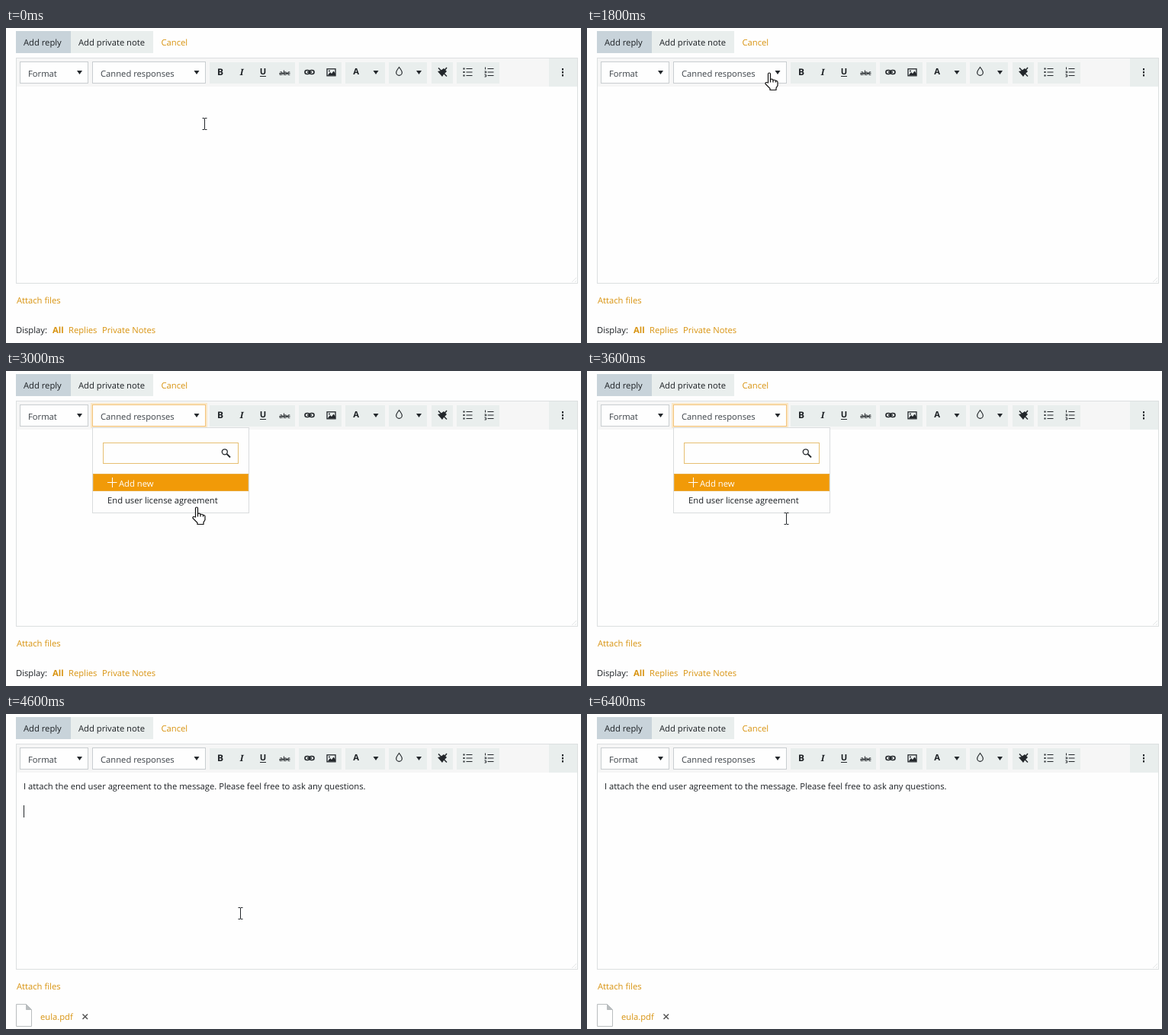
An HTML page for the animation above (6.8 s loop, 754x414 px).

```html
<!DOCTYPE html>
<html lang="en">
<head>
<meta charset="utf-8">
<title>Canned response</title>
<style>
html, body { margin: 0; width: 100%; height: 100%; overflow: hidden; background: #fefefe; }
svg { display: block; }
text { font: 11.22px "Open Sans", "Noto Sans", sans-serif; fill: #1b1f23; text-rendering: geometricPrecision; white-space: pre; }
.link { fill: #d8930f; }
.bold { font-weight: 700; }
.mid { text-anchor: middle; }
.group { fill: #e9eeed; }
.box { fill: #fefefe; stroke: #c9cdd0; }
.line { fill: none; stroke: #23272b; }
.ink { fill: #23272b; }
</style>
</head>
<body>
<svg width="754" height="414" viewBox="0 0 754 414">
  <defs>
    <path id="arrow" class="ink" d="M-3.5 -2.5h7l-3.5 5z"/>
    <clipPath id="below"><rect x="112" y="74" width="209" height="115"/></clipPath>
  </defs>

  <rect x="13" y="4" width="72" height="29" fill="#c8d3da"/>
  <rect class="group" x="85" y="4" width="108" height="29"/>
  <text x="23" y="23">Add reply</text>
  <text x="95" y="23">Add private note</text>
  <text x="203.5" y="23" class="link">Cancel</text>

  <rect x="13.5" y="39.5" width="736" height="296" fill="#fefefe" stroke="#dcdfe0"/>
  <path d="M14 40h735v37h-735z" fill="#f6f6f6"/>
  <path class="group" d="M712 40h37v37h-37zM267 45h112v28h-112zM384 45h56v28h-56zM445 45h52v28h-52zM502 45h50v28h-50zM558 45h28v28h-28zM591 45h56v28h-56z"/>
  <path d="M742 334l6-6M746 334l2-2" stroke="#e4e6e7"/>

  <rect class="box" x="18.5" y="44.5" width="89" height="28"/>
  <text x="29" y="64" style="fill:#3c4248">Format</text>
  <use href="#arrow" x="96.5" y="58.5"/>
  <rect id="ring" x="112.5" y="43.5" width="150" height="30" fill="none" stroke="#fbe8c8" stroke-width="3"/>
  <rect id="select" class="box" x="113.5" y="44.5" width="148" height="28"/>
  <text x="124" y="64" style="fill:#3c4248">Canned responses</text>
  <use href="#arrow" x="250" y="58.5"/>

  <text x="281" y="62" class="mid bold" style="font-size:12px">B</text>
  <text x="309" y="62" class="mid bold" style="font:italic 700 11.5px 'Noto Serif',serif">I</text>
  <text x="337" y="61" class="mid bold">U</text>
  <path class="line" d="M333 63.5h8M358.5 59.5h14"/>
  <text x="365.5" y="62" class="mid" style="font-size:8.5px;font-weight:600">abc</text>
  <g class="line" stroke-width="1.6">
    <rect x="392" y="55.5" width="6" height="5" rx="2.5"/>
    <rect x="398" y="55.5" width="6" height="5" rx="2.5"/>
    <path d="M395 58h6"/>
    <rect x="421" y="53.8" width="11" height="9" stroke-width="1.3"/>
  </g>
  <path class="ink" d="M422 62l3-4 2 2 2.500-3.500 2.500 3.500v2z"/>
  <circle class="ink" cx="424" cy="56.500" r="1"/>
  <text x="459" y="61" class="mid bold">A</text>
  <use href="#arrow" x="485" y="58.5"/>
  <path class="line" stroke-width="1.2" d="M515.500 51.500q-3.800 5-3.800 7a3.800 3.800 0 0 0 7.600 0q0-2-3.800-7z"/>
  <use href="#arrow" x="541.5" y="58.5"/>
  <path class="ink" d="M566 57l4-1 4-3 4 4-4 4-2 3z"/>
  <path class="line" stroke-width="1.5" d="M567 52.500l11 11M574 57l4-5"/>
  <path class="line" stroke-width="1.2" d="M603.500 53.500h8M603.500 58h8M603.500 62.500h8M631.500 53.500h8M631.500 58h8M631.500 62.500h8"/>
  <path class="line" stroke-width="2" d="M599.500 53.500h2M599.500 58h2M599.500 62.500h2"/>
  <path class="line" d="M628.500 51.500v3M627.500 57h2v2h-2M627.500 61.500h2v2.500h-2"/>
  <path class="ink" d="M729 53h2v2.400h-2zM729 57h2v2.400h-2zM729 61h2v2.400h-2z"/>

  <text id="message" x="23" y="99">I attach the end user agreement to the message. Please feel free to ask any questions.</text>
  <path id="caret" class="line" d="M23.500 120v16"/>

  <g clip-path="url(#below)">
    <g id="menu">
      <rect class="box" x="113.500" y="74.500" width="205" height="112" style="stroke:#d9dcdd"/>
      <rect class="box" x="127.500" y="94.500" width="177" height="27" style="stroke:#e6bf72"/>
      <path id="searchCaret" class="line" d="M137.500 100v16"/>
      <circle class="line" cx="286.800" cy="106.300" r="3.500" stroke-width="1.300"/>
      <path class="line" stroke-width="1.800" d="M289.500 109l4.500 4.500"/>
      <rect x="114.500" y="135.500" width="203" height="22" fill="#f19a08" stroke="#e9aa3c"/>
      <path d="M133 146.500h12.500M139.500 140v13" stroke="#fff"/>
      <text x="148" y="152" style="fill:#fff">Add new</text>
      <text x="133" y="174">End user license agreement</text>
    </g>
  </g>

  <text x="14" y="362" class="link">Attach files</text>
  <g id="filter">
    <text x="13" y="401">Display:</text>
    <text x="61" y="401" class="link bold">All</text>
    <text x="82" y="401" class="link">Replies</text>
    <text x="126" y="401" class="link">Private Notes</text>
  </g>
  <g id="file">
    <path d="M13.500 381.500h13l7 7v22h-20zM26.500 381.500v7h7" fill="#fefefe" stroke="#b9bdbf"/>
    <path d="M26.500 381.500v7h7z" fill="#b9bdbf"/>
    <text x="45" y="402" class="link">eula.pdf</text>
    <path d="M100.500 394.500l6.500 6.500m0-6.500l-6.500 6.500" stroke="#555" stroke-width="1.500"/>
  </g>

  <g id="pointer">
    <path id="beam" class="line" d="M-2.500 -7.500h2.500l.5.500.5-.500h2.500M.5 -7v14M-2.500 7.500h2.500l.5-.500.5.500h2.500"/>
    <g id="hand" stroke="#111" stroke-width="1.200">
      <path fill="#fff" d="M-1.500 13V1.500a1.500 1.500 0 0 1 3 0V8.500q3-1 3.500 1q3-.8 3.500 1q2.500-.3 2.500 2v4l-2 3.500v2.500h-8v-2l-6-6q-.5-3 3.500-1.500z"/>
      <path fill="none" d="M1.500 8.500v4M5 9.500v3M8.500 10.500v2"/>
    </g>
  </g>
</svg>
<script>
const LOOP = 6800, STEP = 200;
const $ = id => document.getElementById(id);
const show = (id, on) => { $(id).style.display = on ? "" : "none"; };
const move = (id, x, y) => $(id).setAttribute("transform", `translate(${x} ${y})`);

// time, x, y of the pointer's hot spot
const path = [
  [0, 260, 126], [600, 239, 66], [800, 239, 66], [1200, 239, 59], [2200, 239, 59],
  [3000, 250, 179], [3400, 250, 179], [3800, 272, 209], [4600, 307, 262],
  [5000, 307, 262], [6200, 567, 26], [LOOP, 567, 26]
];
// time, vertical offset of the sliding menu
const slide = [[0, -114], [1800, -114], [2200, 0], [3600, 0], [3800, -97], [4000, -114], [LOOP, -114]];

function sample(keys, t) {
  const i = keys.findIndex(k => k[0] > t);
  const a = keys[i - 1], b = keys[i], p = (t - a[0]) / (b[0] - a[0]);
  return a.slice(1).map((v, n) => v + (b[n + 1] - v) * p);
}

function draw(t) {
  const [x, y] = sample(path, t).map(Math.round), [drop] = sample(slide, t);
  const focus = t >= 2000 && t < 4000, hand = t >= 600 && t < 3600;
  move("pointer", x, y);
  show("pointer", t < 6400);
  show("hand", hand);
  show("beam", !hand);
  move("menu", 0, drop);
  show("menu", focus);
  show("ring", focus);
  $("select").style.stroke = focus ? "#f3c47c" : "";
  show("searchCaret", t < 2800);
  show("message", t >= 3800);
  show("caret", t >= 3800 && Math.floor((t - 4600) / 600) % 2 === 0);
  show("file", t >= 4000);
  show("filter", t < 4000);
}

const start = performance.now();
function tick() {
  const t = (performance.now() - start) % LOOP;
  draw(Math.floor(t / STEP) * STEP);
  requestAnimationFrame(tick);
}
tick();
</script>
</body>
</html>
```
